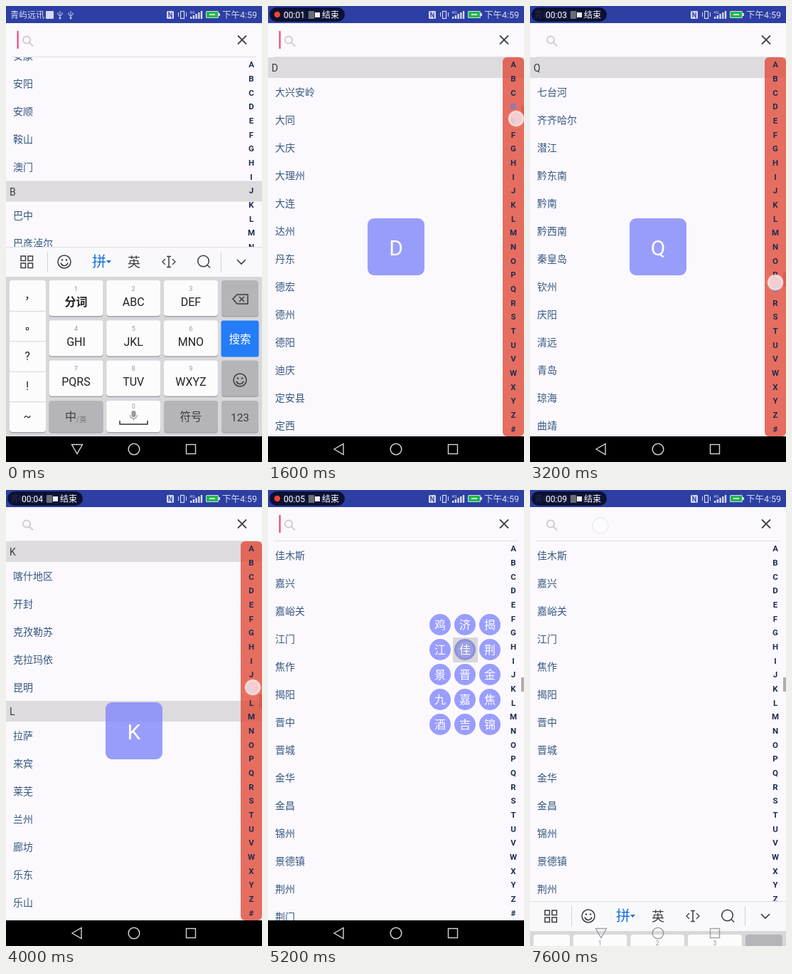
An HTML page with a canvas for the animation above (8 s loop, 360 by 640 pixels).

```html
<!DOCTYPE html>
<html lang="zh-CN">
<head>
<meta charset="utf-8">
<title>City index</title>
<style>
html, body { margin: 0; width: 100%; height: 100%; overflow: hidden; background: #fbf9fd; }
canvas { display: block; width: 360px; height: 640px; }
</style>
</head>
<body>
<canvas id="stage"></canvas>
<script>
const canvas = document.getElementById('stage');
const c = canvas.getContext('2d');
const ratio = window.devicePixelRatio || 1;
canvas.width = 360 * ratio;
canvas.height = 640 * ratio;

const STEP = 400, LOOP = 8000;
const SANS = 'Roboto, "Noto Sans CJK SC", "Noto Sans CJK", sans-serif';
const LETTERS = 'ABCDEFGHIJKLMNOPQRSTUVWXYZ#';
const VIOLET = '#999dfd', INK = '#3c3c40', PAPER = '#fbf9fd';

const cities = {
  A: '安康 安阳 安顺 鞍山 澳门 B 巴中 巴彦淖尔 巴音郭楞 白城 白山 白银 百色 蚌埠 包头',
  D: 'D 大兴安岭 大同 大庆 大理州 大连 达州 丹东 德宏 德州 德阳 迪庆 定安县 定西',
  H: 'H 哈密 哈尔滨 海东 海北 海南州 海口 海西 邯郸 汉中 杭州 合肥 和田 河池',
  J: 'J 吉安 吉林 济南 济宁 济源 鸡西 佳木斯 嘉兴 嘉峪关 江门 焦作 揭阳 晋中 晋城 金华 金昌 锦州 景德镇 荆州 荆门',
  K: 'K 喀什地区 开封 克孜勒苏 克拉玛依 昆明 L 拉萨 来宾 莱芜 兰州 廊坊 乐东 乐山 丽水',
  N: 'N 那曲 南充 南京 南宁 南平 南通 南阳 内江 宁波 宁德 怒江 P 盘锦',
  Q: 'Q 七台河 齐齐哈尔 潜江 黔东南 黔南 黔西南 秦皇岛 钦州 庆阳 清远 青岛 琼海 曲靖'
};
for (const key in cities) cities[key] = cities[key].split(' ');
cities.Jia = cities.J.slice(7);

// Each drag step: letter under the finger and the finger position
const DRAG = [['D', 349, 158], ['H', 348, 215], ['K', 347, 273], ['N', 346, 331],
              ['Q', 345, 388], ['N', 346, 332], ['K', 347, 277]];
const THUMB = { D: 140, H: 214, K: 287, N: 331, Q: 374 };
const CARET = '11001011010101011010';
const DOT = '01101011010101010010';
const SECONDS = '00011223344455677789';

function box(x, y, w, h, fill, r = 0) {
  c.fillStyle = fill;
  c.beginPath();
  c.roundRect(x, y, w, h, r);
  c.fill();
}

function disc(x, y, r, fill, stroke, width = 1) {
  c.beginPath();
  c.arc(x, y, r, 0, Math.PI * 2);
  if (fill) { c.fillStyle = fill; c.fill(); }
  if (stroke) { c.strokeStyle = stroke; c.lineWidth = width; c.stroke(); }
}

function line(points, color, width = 1, close = false) {
  c.beginPath();
  for (let i = 0; i < points.length; i += 2) c.lineTo(points[i], points[i + 1]);
  if (close) c.closePath();
  c.strokeStyle = color;
  c.lineWidth = width;
  c.stroke();
}

function text(str, x, y, size, color, align = 'center', weight = 400) {
  c.font = `${weight} ${size}px ${SANS}`;
  c.textAlign = align;
  c.fillStyle = color;
  c.fillText(str, x, y + size * 0.37);
}

function smiley(x, y) {
  disc(x, y, 9, null, INK, 1.5);
  disc(x - 3, y - 2.5, 1.2, INK);
  disc(x + 3, y - 2.5, 1.2, INK);
  c.beginPath();
  c.arc(x, y + 0.5, 5, 0.2, Math.PI - 0.2);
  c.stroke();
}

function lens(x, y, r, handle, color, width) {
  disc(x, y, r, null, color, width);
  const from = r * 0.71, to = from + handle;
  line([x + from, y + from, x + to, y + to], color, width);
}

function usb(x) {
  const tone = '#c5cbed';
  line([x, 7, x, 17], tone);
  line([x - 3, 9, x - 3, 12, x, 14, x + 3, 12, x + 3, 9], tone);
  disc(x, 17, 1.5, tone);
}

function statusBar(k) {
  const tone = '#d6daf2';
  box(0, 0, 360, 24, '#2d3fa2');
  text('青屿远讯', 6, 12.5, 12, tone, 'left');
  box(56, 7, 11, 11, tone, 1);
  usb(76);
  usb(91);

  box(226, 7, 10, 11, tone, 1.5);
  line([229, 16, 229, 9, 233, 16, 233, 9], '#2d3fa2', 1.2);
  c.strokeStyle = tone;
  c.strokeRect(245.5, 7.5, 5, 10);
  line([242.5, 9, 242.5, 15], tone);
  line([253.5, 9, 253.5, 15], tone);
  text('4G', 262, 8.5, 6, tone);
  for (let i = 0; i < 5; i++) box(259 + i * 3.7, 15 - i * 2, 2.4, 3 + i * 2, tone);
  box(281, 7, 18, 10, tone, 1.5);
  box(282, 8, 16, 8, '#1fb84a');
  box(299, 10, 2, 4, tone);
  line([286, 12, 294, 12], '#fff', 1.5);
  text('下午4:59', 353, 12.5, 12.5, tone, 'right');

  if (k < 1) return;
  const lit = DOT[k] === '1';
  box(2, 2, 106, 20, 'rgba(5,10,34,.85)', 10);
  if (lit) {
    box(5, 5, 17, 14, '#0b112f', 7);
    disc(13, 12, 4.2, '#f3422e');
  }
  text('00:0' + SECONDS[k], 22, 12.5, 12, '#fff', 'left');
  box(57, 7, 8, 11, '#6a6d79', 1);
  box(66, 9, 7, 7, '#f2f2f4');
  text('结束', 76, 12.5, 12, '#fff', 'left');
}

function searchBar(k) {
  box(0, 24, 360, 48, PAPER);
  line([8, 71.5, 352, 71.5], '#e1dfe3');
  lens(29, 47.5, 5, 5.5, '#cfcdd0', 2);
  if (CARET[k] === '1') box(15.5, 35, 2.2, 25, '#ee4477');
  line([326, 41.5, 338, 53.5], '#444', 1.8);
  line([338, 41.5, 326, 53.5], '#444', 1.8);
}

function cityList(items, y) {
  for (const item of items) {
    if (LETTERS.includes(item)) {
      box(0, y, 360, 29, '#dddbde');
      text(item, 5, y + 15, 14, '#39393c', 'left');
      y += 29;
    } else {
      text(item, 10, y + 19.5, 14, '#365780', 'left');
      y += 39;
    }
  }
}

function indexBar(letter) {
  if (letter) box(330, 72, 30, 532, 'rgba(225,76,58,.8)', 6);
  for (let i = 0; i < 27; i++) {
    const on = LETTERS[i] === letter;
    text(LETTERS[i], 345, 82 + i * 19.67, 11.5, on ? '#3b88f5' : '#1c2c50', 'center', 700);
  }
}

function touch(x, y) {
  disc(x, y, 12, 'rgba(255,235,235,.25)');
  disc(x, y, 10, 'rgba(246,222,226,.8)', 'rgba(255,246,246,.8)', 1.5);
}

function faintTouch(x, y) {
  disc(x, y, 11, 'rgba(255,255,255,.3)', 'rgba(90,80,100,.13)');
}

function charGrid(pressed) {
  [...'鸡济揭江佳荆景晋金九嘉焦酒吉锦'].forEach((ch, i) => {
    const x = 242 + i % 3 * 35, y = 189 + Math.floor(i / 3) * 35;
    const down = pressed && ch === '佳';
    if (down) box(x - 17, y - 17, 35, 35, '#d9d7dc');
    disc(x, y, 15, down ? '#8d91da' : VIOLET);
    if (down) disc(x, y, 11, 'rgba(255,255,255,.12)', 'rgba(255,255,255,.15)');
    text(ch, x, y, 16, '#fff');
  });
}

function key(x, y, w, h, fill = '#fcfcfd') {
  box(x, y + 1.5, w, h, '#a4a4a8', 4);
  box(x, y, w, h, fill, 4);
}

function toolbar(pressed) {
  box(0, 338, 360, 42, '#f9f9fb');
  line([0, 338.5, 360, 338.5], '#dedee1');
  if (pressed) box(306, 341, 51, 37, '#dcdce8', 2);
  line([58.5, 345, 58.5, 373], '#d2d2d5');
  line([302.5, 345, 302.5, 373], '#d2d2d5');
  c.strokeStyle = INK;
  c.lineWidth = 1.5;
  for (const x of [21, 31]) for (const y of [351, 361]) c.strokeRect(x, y, 6.5, 6.5);
  smiley(82, 359);
  text('拼', 131, 359, 20, '#176fd6', 'center', 500);
  c.beginPath();
  c.moveTo(141, 357);
  c.lineTo(148, 357);
  c.lineTo(144.5, 361);
  c.fill();
  text('英', 180, 359, 18, INK);
  line([229, 352, 229, 366], INK, 1.5);
  line([226, 351.5, 232, 351.5], INK, 1.5);
  line([226, 366.5, 232, 366.5], INK, 1.5);
  line([224, 355, 220, 359, 224, 363], INK, 1.3);
  line([234, 355, 238, 359, 234, 363], INK, 1.3);
  lens(277.5, 358, 7.8, 4, INK, 1.5);
  const tone = pressed ? '#3470bd' : INK;
  line([325, 356, 331, 362, 337, 356], tone, 1.6);
}

function keyboard(shift, pressed) {
  const gray = '#b5b5b9';
  c.save();
  c.translate(0, shift);
  box(0, 338, 360, 302, '#d8d8dc');
  toolbar(pressed);

  key(5, 385, 51, 213);
  for (let i = 1; i < 5; i++) line([5, 386 + i * 42.4, 56, 386 + i * 42.4], '#d4d4d7');
  text('，', 34, 405, 16, '#222');
  disc(30, 453, 1.8, null, '#222', 1.1);
  ['?', '!', '~'].forEach((mark, i) => text(mark, 30, 491 + i * 42.4, 16, '#222'));

  ['分词', 'ABC', 'DEF', 'GHI', 'JKL', 'MNO', 'PQRS', 'TUV', 'WXYZ'].forEach((label, i) => {
    const x = 60.5 + i % 3 * 80.7, y = 385 + Math.floor(i / 3) * 56.2;
    key(x, y, 76, 50);
    text(i + 1, x + 38, y + 11, 9.5, '#9a9a9e');
    text(label, x + 38, y + 30, 16, '#222', 'center', i ? 400 : 700);
  });

  key(303, 385, 52, 50, gray);
  line([319, 411, 325, 405, 340, 405, 340, 418, 325, 418], INK, 1.5, true);
  line([328, 408, 335, 415], INK, 1.4);
  line([335, 408, 328, 415], INK, 1.4);
  box(302.5, 441.5, 53, 51, '#247cf6', 3);
  text('搜索', 329, 467, 15.5, '#fff');
  key(303, 497.5, 52, 50, gray);
  smiley(329, 525);

  for (const x of [60.5, 222, 303]) key(x, 554, x > 300 ? 52 : 76, 44, gray);
  key(141.2, 554, 76, 44);
  text('中', 91, 576, 16, INK);
  text('/英', 99, 580, 10, '#77777b', 'left');
  text('0', 179.5, 562, 8.5, '#9a9a9e');
  box(176.5, 568, 6, 9, '#98989d', 3);
  c.strokeStyle = '#98989d';
  c.lineWidth = 1.2;
  c.beginPath();
  c.arc(179.5, 574, 5, 0, Math.PI);
  c.stroke();
  line([179.5, 579, 179.5, 582], '#98989d');
  line([160, 582, 160, 587, 199, 587, 199, 582], '#333', 1.5);
  text('符号', 260, 576, 15.5, INK);
  text('123', 329, 577, 15.5, INK);
  c.restore();
}

function navBar(clear, down) {
  if (!clear) box(0, 604, 360, 36, '#000');
  const tone = clear ? 'rgba(125,125,130,.7)' : '#d4d4d4';
  const back = down ? [92.5, 615.5, 107.5, 615.5, 100, 628.5] : [93, 622, 106, 614.5, 106, 629.5];
  line(back, tone, 1.4, true);
  disc(180, 622, 7.8, null, tone, 1.5);
  c.strokeStyle = tone;
  c.lineWidth = 1.4;
  c.strokeRect(253.5, 615.5, 13, 13);
}

function thumbPosition(k, letter) {
  if (letter) return THUMB[letter];
  if (k === 2 || k === 3) return 82;
  if (k === 11 || k === 12) return 257;
  if (k >= 13 && k <= 16 || k === 19) return 263;
  return 0;
}

function render(ms) {
  const k = Math.floor(ms % LOOP / STEP);
  const drag = DRAG[k - 4];
  const letter = drag && drag[0];
  const shift = { 0: 0, 1: 0, 2: 80, 19: 239 }[k];
  const hasKeys = shift !== undefined;
  const bottom = hasKeys ? 338 + shift : 604;

  c.setTransform(ratio, 0, 0, ratio, 0, 0);
  box(0, 0, 360, 640, PAPER);
  statusBar(k);
  searchBar(k);

  c.save();
  c.beginPath();
  c.rect(0, 72, 360, bottom - 72);
  c.clip();
  const list = letter || (k < 4 ? 'A' : k < 13 ? 'J' : 'Jia');
  cityList(cities[list], k < 4 ? 50.5 : 72);
  const thumb = thumbPosition(k, letter);
  if (thumb) box(356, thumb, 4, 20, k === 16 ? 'rgba(70,55,60,.18)' : 'rgba(70,55,60,.4)');
  indexBar(letter);
  if (letter) {
    box(140, 298, 80, 80, 'rgba(128,134,253,.8)', 9);
    text(letter, 180, 339, 30, '#fff');
  }
  if (k >= 11 && k <= 14) charGrid(k === 13);
  c.restore();

  if (hasKeys) keyboard(shift, k === 1 || k === 2);
  navBar(k === 2 || k === 19, k === 0 || k === 19);
  if (drag) touch(drag[1], drag[2]);
  if (k === 1 || k === 2) faintTouch(345, 358);
  if (k >= 18) faintTouch(99, 50);
}

let start;
function tick(now) {
  if (start === undefined) start = now;
  render(now - start);
  requestAnimationFrame(tick);
}
render(0);
requestAnimationFrame(tick);
</script>
</body>
</html>
```
